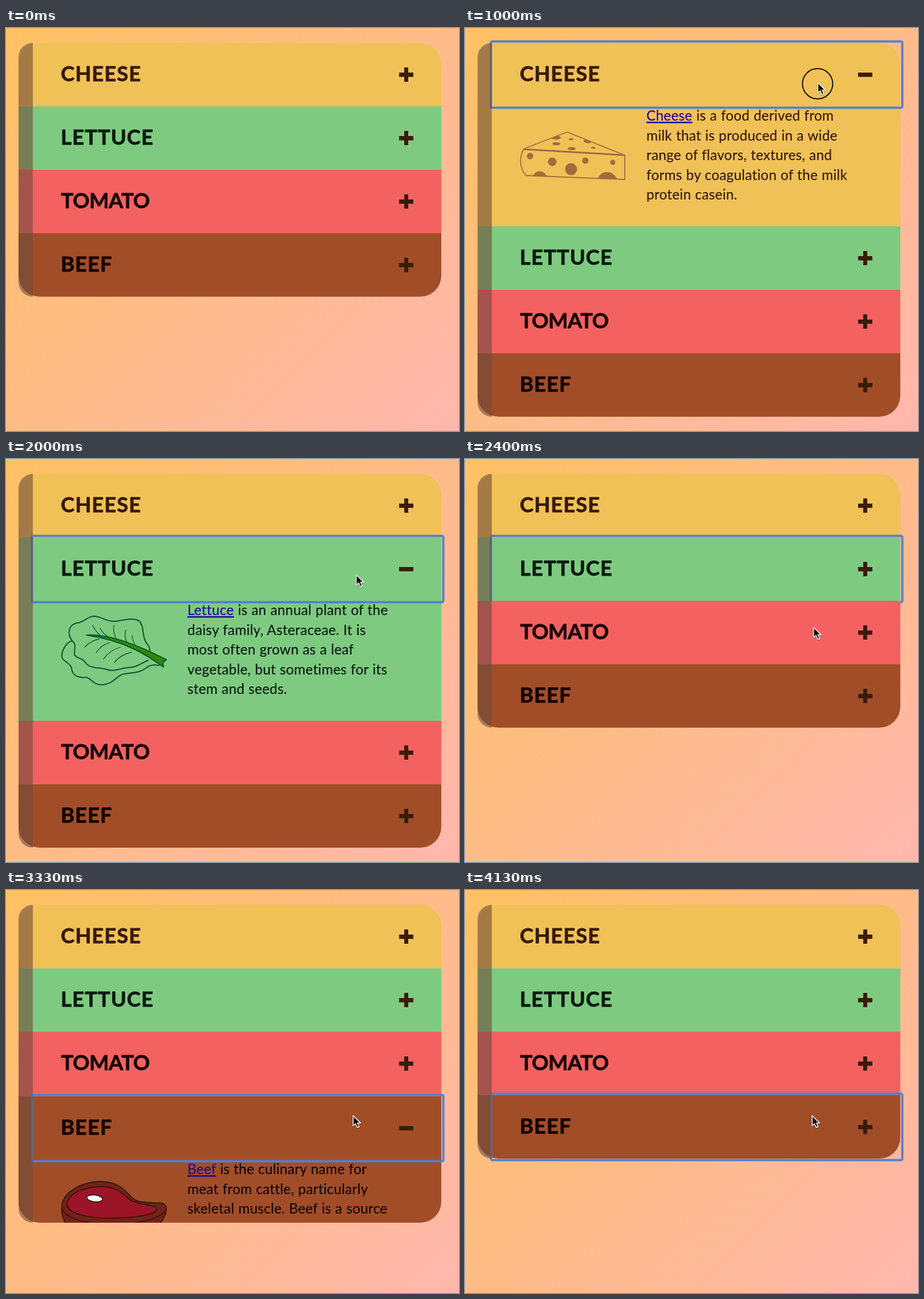
An HTML page for the animation above (4190 ms loop, 794 by 705 pixels).

```html
<!DOCTYPE html>
<html lang="en">
<head>
<meta charset="utf-8">
<title>Burger accordion</title>
<style>
  html, body { margin: 0; width: 100%; height: 100%; overflow: hidden; }
  body { position: relative; background: linear-gradient(135deg, #fec163, #ffb7ae); font-family: Lato, "Open Sans", sans-serif; }
  svg { display: block; overflow: visible; }

  .card { position: absolute; left: 22px; top: 26px; width: 741px; }
  .strip { position: absolute; left: 0; top: 0; bottom: 0; width: 25px; border-radius: 25px 0 0 25px; background: rgba(112, 76, 60, .6); }

  section { position: relative; background: var(--bg); }
  section:first-child { border-radius: 37px 37px 0 0; }
  section:nth-child(4) { border-radius: 0 0 37px 37px; }
  .cheese  { --bg: #f0c156; --ink: #361a0d; --h: 209.8px; --at: 550ms; --ring: ring1; }
  .lettuce { --bg: #7fca81; --ink: #081b10; --h: 209.8px; --at: 1535ms; --ring: ring2; }
  .tomato  { --bg: #f36261; --ink: #1a0507; --h: 175.2px; --at: 2525ms; --ring: ring3; }
  .beef    { --bg: #a14e28; --ink: #150201; --h: 209.8px; --at: 3230ms; --ring: ring4; }

  text { fill: var(--ink); stroke: var(--ink); stroke-linejoin: round; }
  .head { width: 741px; height: 111px; }
  .head text { font-size: 36.5px; font-weight: 700; letter-spacing: 1px; stroke-width: .8px; }
  .tomato .head text { letter-spacing: -.5px; }
  .head rect { fill: #3a1c06; }
  .bar { animation: bar 4190ms var(--at) step-end infinite; }

  .panel { height: 0; overflow: hidden; animation: slide 4190ms var(--at) infinite; }
  .panel svg { width: 741px; height: 210px; }
  .panel text { font-size: 24.3px; letter-spacing: .27px; word-spacing: .5px; stroke-width: .2px; }
  .link { fill: #2206a5; stroke: #2206a5; text-decoration: underline; }

  .ring { position: absolute; left: 21.5px; top: -4px; width: 718px; height: 113px; border: 3px solid #4f80d2; border-radius: 4px; opacity: 0;
    box-shadow: 0 0 0 1px rgba(79, 128, 210, .45), inset 0 0 0 1px rgba(79, 128, 210, .45);
    animation: var(--ring) 4190ms step-end infinite; }

  .mouse { position: absolute; left: 0; top: 0; width: 1px; height: 1px; opacity: 0; animation: move 4190ms ease-in-out infinite; }
  .mouse path { filter: drop-shadow(0 1px 1px rgba(0, 0, 0, .35)); }
  .press { opacity: 0; animation: press 4190ms step-end infinite; }

  @keyframes slide {
    0% { height: 0; }
    7.88%, 12.53% { height: var(--h); }
    20.41%, 100% { height: 0; }
  }
  @keyframes bar { 0% { opacity: 0; } 12.53%, 100% { opacity: 1; } }
  @keyframes ring1 { 0% { opacity: 0; } 10.98% { opacity: 1; } 34.37%, 100% { opacity: 0; } }
  @keyframes ring2 { 0% { opacity: 0; } 34.37% { opacity: 1; } 58.23%, 100% { opacity: 0; } }
  @keyframes ring3 { 0% { opacity: 0; } 58.23% { opacity: 1; } 75.54%, 100% { opacity: 0; } }
  @keyframes ring4 { 0% { opacity: 0; } 75.54%, 100% { opacity: 1; } }
  @keyframes press {
    0%, 13.01%, 25.54%, 36.4%, 49.16%, 60.02%, 72.67%, 76.97%, 89.5%, 100% { opacity: 0; }
    10.98%, 23.15%, 34.37%, 47.97%, 58.23%, 71.84%, 75.54%, 88.07% { opacity: 1; }
  }
  @keyframes move {
    0%, 1.6% { opacity: 0; transform: translate(750px, 300px); }
    1.61% { opacity: 1; transform: translate(750px, 300px); }
    10.02%, 26.25% { opacity: 1; transform: translate(618px, 95px); }
    33.41%, 50.84% { opacity: 1; transform: translate(613.5px, 202px); }
    57.52%, 72.91% { opacity: 1; transform: translate(610.5px, 294px); }
    75.3%, 100% { opacity: 1; transform: translate(608px, 394px); }
  }
</style>
</head>
<body>
<div class="card">
  <section class="cheese">
    <svg class="head"><text x="74" y="66.7">CHEESE</text><rect x="667" y="52" width="25" height="7.5"/><rect class="bar" x="676" y="43" width="7" height="25"/></svg>
    <div class="panel">
      <svg viewBox="22 137 741 210">
        <g fill="none" stroke="#a36b3d" stroke-width="1.8" stroke-linejoin="round">
          <path d="M104 211L179 182L276 221M102 213C95 228 96 246 107 258L280 265V222"/>
          <path d="M102 212L280 222.5" stroke-width="3"/>
        </g>
        <g fill="#a36b3d">
          <circle cx="114" cy="224" r="5.5"/><circle cx="153" cy="234" r="7.5"/><circle cx="186" cy="247" r="10.5"/>
          <circle cx="211" cy="232" r="5.5"/><circle cx="259" cy="235" r="4.5"/>
          <path d="M119 259C124 248 138 248 144 260zM233 263C239 248 260 248 267 265zM151 193L161 189C170 188 170 194 162 195Q155 196 151 193zM208 196Q214 194 222 200Q215 204 208 199z"/>
          <ellipse cx="186" cy="194.5" rx="4" ry="1.8"/><ellipse cx="160" cy="202.5" rx="7" ry="2.8"/>
          <ellipse cx="187" cy="211" rx="7" ry="2.8"/><ellipse cx="225" cy="209.5" rx="4" ry="1.6"/>
        </g>
        <text><tspan x="318" y="162" class="link">Cheese</tspan> is a food derived from<tspan x="318" dy="34.55">milk that is produced in a wide</tspan><tspan x="318" dy="34.55">range of flavors, textures, and</tspan><tspan x="318" dy="34.55">forms by coagulation of the milk</tspan><tspan x="318" dy="34.55">protein casein.</tspan></text>
      </svg>
    </div>
    <div class="ring"></div>
  </section>

  <section class="lettuce">
    <svg class="head"><text x="74" y="66.7">LETTUCE</text><rect x="667" y="52" width="25" height="7.5"/><rect class="bar" x="676" y="43" width="7" height="25"/></svg>
    <div class="panel">
      <svg viewBox="22 248 741 210">
        <g fill="none" stroke="#04562f" stroke-width="2" stroke-linecap="round" stroke-linejoin="round">
          <path d="M116 318C107 306 109 290 124 287C140 285 141 275 155 275C168 276 175 284 190 284C207 283 220 276 233 283C242 291 239 308 244 318C249 327 254 330 252 341"/>
          <path d="M116 318C104 321 95 340 99 349C104 356 113 357 115 366C116 380 128 383 141 382C150 384 152 395 168 395C186 394 190 384 203 377C217 373 232 376 245 366Q254 358 268 361"/>
          <path d="M116 318C126 326 117 337 121 344C127 350 135 348 140 357C147 367 162 364 176 368C188 373 200 366 213 365C228 365 238 357 249 352"/>
          <path stroke-width="1.3" d="M166 309Q157 302 152 291M179 311Q169 305 165 296M194 316Q187 304 189 291M213 323Q206 310 210 299M231 332Q222 322 221 309M163 315Q148 318 138 329M182 321Q166 326 158 339M201 329Q181 335 171 350M220 338Q201 342 190 356"/>
          <path fill="#2f8706" d="M141 308C183 306 232 326 281 351L275 356L276 364C246 342 208 318 141 308z"/>
        </g>
        <text><tspan x="318" y="273" class="link">Lettuce</tspan> is an annual plant of the<tspan x="318" dy="34.55">daisy family, Asteraceae. It is</tspan><tspan x="318" dy="34.55">most often grown as a leaf</tspan><tspan x="318" dy="34.55">vegetable, but sometimes for its</tspan><tspan x="318" dy="34.55">stem and seeds.</tspan></text>
      </svg>
    </div>
    <div class="ring"></div>
  </section>

  <section class="tomato">
    <svg class="head"><text x="74.5" y="66.7">TOMATO</text><rect x="667" y="52" width="25" height="7.5"/><rect class="bar" x="676" y="43" width="7" height="25"/></svg>
    <div class="panel">
      <svg viewBox="22 359 741 210">
        <g id="fruit" fill="#3a1c06">
          <path d="M140 394C150 390 162 390 171 396C184 403 190 416 189 430C188 454 165 471 143 471C120 470 99 452 99 427C99 410 107 399 119 393Q130 389 140 394z" fill="#b2212c" stroke="#3a1c06" stroke-width="3.5"/>
          <path d="M147 402L138 391L145 396L144 387L149 396L154 388L153 397L160 392L155 401Q166 399 173 405Q162 403 155 407L164 418Q155 414 150 409Q149 416 146 425Q143 414 144 408Q135 412 128 419Q133 411 138 407Q127 405 117 408Q126 399 140 401z"/>
          <path d="M112 412Q102 425 110 446Q99 432 104 418zM181 428Q184 448 166 459Q180 443 181 428zM126 455Q132 466 146 469Q128 470 126 455z"/>
        </g>
        <use href="#fruit" x="92"/>
        <text><tspan x="318" y="384">The </tspan><tspan class="link">tomato</tspan> is the edible, often<tspan x="318" dy="34.55">red, fruit of the plant Solanum</tspan><tspan x="318" dy="34.55">lycopersicum, commonly known</tspan><tspan x="318" dy="34.55">as a tomato plant.</tspan></text>
      </svg>
    </div>
    <div class="ring"></div>
  </section>

  <section class="beef">
    <svg class="head"><text x="74" y="66.7">BEEF</text><rect x="667" y="52" width="25" height="7.5"/><rect class="bar" x="676" y="43" width="7" height="25"/></svg>
    <div class="panel">
      <svg viewBox="22 470 741 210">
        <g stroke="#321505" stroke-width="1.8" stroke-linejoin="round">
          <path fill="#74211a" d="M98 552C98 529 130 508 167 508C205 509 211 530 226 540C239 547 262 544 274 546C281 548 282 555 280 562C278 572 271 581 265 587C235 597 185 606 150 604C115 602 96 580 98 552z"/>
          <path fill="none" d="M98 552C100 575 150 584 190 583C230 582 268 575 280 558"/>
          <path fill="#9c1427" d="M107 545C112 525 145 516 172 517C200 519 208 535 221 542C235 550 260 547 264 556C264 566 230 571 190 572C150 573 105 566 107 545z"/>
          <ellipse fill="#fff" cx="155.5" cy="537.5" rx="14" ry="6" transform="rotate(7 155.5 537.5)"/>
        </g>
        <text><tspan x="318" y="495" class="link">Beef</tspan> is the culinary name for<tspan x="318" dy="34.55">meat from cattle, particularly</tspan><tspan x="318" dy="34.55">skeletal muscle. Beef is a source</tspan><tspan x="318" dy="34.55">of high-quality protein and</tspan><tspan x="318" dy="34.55">essential nutrients.</tspan></text>
      </svg>
    </div>
    <div class="ring"></div>
  </section>
  <div class="strip"></div>
</div>

<svg class="mouse">
  <circle class="press" cy="2.5" r="26.5" fill="none" stroke="#111" stroke-width="2"/>
  <path d="M.5 .8V18.5L4.7 14.800L7.700 21.500L11 20L8 13.600H13.500z" fill="#000" stroke="#fff" stroke-width="1.5" stroke-linejoin="round"/>
</svg>
</body>
</html>
```
